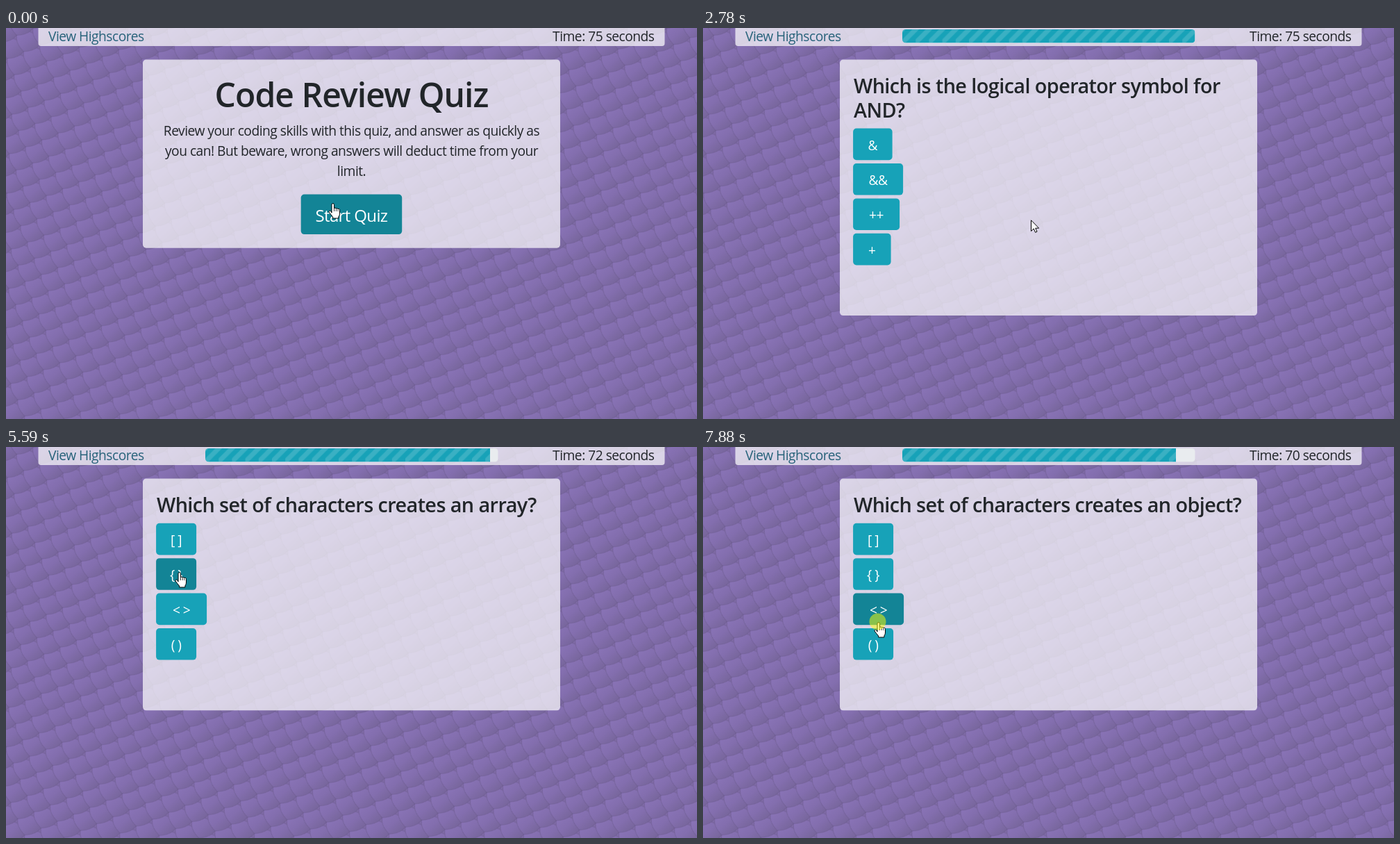
Write an HTML page that moves like this. It is 995x563 px and loops after 8000 ms.

```html
<!DOCTYPE html>
<html lang="en">
<head>
<meta charset="utf-8">
<title>Code Review Quiz</title>
<style>
html, body { margin: 0; width: 100%; height: 100%; overflow: hidden; background: #806ca8; }
svg { display: block; width: 995px; height: 563px; }
text { font-family: "Open Sans", "Noto Sans", sans-serif; font-size: 19.2px; letter-spacing: -.026em; fill: #212529; white-space: pre; }
.link { fill: #27627a; }
.h1 { font-size: 48px; font-weight: 600; letter-spacing: -.02em; }
.h4 { font-size: 28.8px; font-weight: 600; letter-spacing: -.02em; }
.big { font-size: 24px; }
.mid { text-anchor: middle; }
.end { text-anchor: end; }
.btn { fill: #fff; }
.note { font-style: italic; font-weight: 300; fill: #6c757d; }
.panel { fill: #fff; fill-opacity: .7; }
</style>
</head>
<body>
<svg viewBox="0 0 995 563">
  <defs>
    <linearGradient id="shade" x1="0" y1=".2" x2="1" y2=".6">
      <stop offset="0" stop-color="#8a74b8"/>
      <stop offset=".5" stop-color="#836eae"/>
      <stop offset="1" stop-color="#76659a"/>
    </linearGradient>
    <path id="scale" d="M-18-8V2C-17 13-8 18 0 22C8 18 17 13 18 2V-8Z" fill="url(#shade)" stroke="#6d5c90" stroke-width=".8"/>
    <pattern id="scales" width="36" height="36" patternUnits="userSpaceOnUse" patternTransform="rotate(22)"></pattern>
    <pattern id="stripes" width="19.2" height="19.2" patternUnits="userSpaceOnUse" x="287" y="2">
      <path d="M0 0H4.8L19.2 14.4V19.2H14.4L0 4.8ZM9.6 0H19.2V9.6Z" fill="none"/>
      <path d="M0 0H4.8L0 4.8ZM14.4 0H19.2V4.8L4.8 19.2H0V14.4Z" fill="#fff" fill-opacity=".15"/>
    </pattern>
    <clipPath id="track"><rect x="287" y="2" width="421.5" height="19.2" rx="4.5"/></clipPath>
    <g id="hand"><path d="M5 14V2.4a1.75 1.75 0 0 1 3.5 0V7.8a1.5 1.5 0 0 1 2.8.5 1.5 1.5 0 0 1 2.7.7 1.4 1.4 0 0 1 2.5 1.2V15q0 3-1.6 4.8V22H6.6V20Q4 17 1 12.9a1.5 1.5 0 0 1 2.3-1.6Z" fill="#fff" stroke="#000" stroke-linejoin="round"/><path d="M8.5 8V12M11.3 8.6V12M14 9.4V12" stroke="#000" stroke-width=".8"/></g>
    <path id="arrow" d="M.5 .8V16.5L4.2 13 6.6 18.3 9 17.2 6.7 12.2H11.6Z" fill="#fff" stroke="#000"/>
    <path id="beam" d="M0 .5H3L4 1.5 5 .5H8M4 1.5V14.5M0 15.5H3L4 14.5 5 15.5H8" fill="none" stroke="#111" stroke-width="1.2"/>
  </defs>
  <rect width="995" height="563" fill="url(#scales)"/>
  <path class="panel" d="M46.5 0H948.5V22Q948.5 26 944.5 26H50.5Q46.5 26 46.5 22Z"/>
  <text class="link" x="61" y="19">View Highscores</text>
  <g id="view"></g>
</svg>
<script>
const LOOP = 8000, BASE = "#17a2b8", HOVER = "#138496", ACTIVE = "#117a8b";
const $ = id => document.getElementById(id);

let tiles = "";
for (let row = 3; row >= -2; row--)
  for (let col = -1; col <= 2; col++)
    tiles += `<use href="#scale" x="${col * 36 + (row & 1) * 18}" y="${row * 18}"/>`;
$("scales").innerHTML = tiles;

const brackets = [["[ ]", 58], ["{ }", 58], ["< >", 73], ["( )", 58]];
const logical = "Which is the logical operator symbol for";
const pages = {
  and: { head: [logical, "AND?"], picks: [["&", 56.5], ["&&", 72], ["++", 67], ["+", 54.5]] },
  array: { head: ["Which set of characters creates an array?"], picks: brackets },
  or: { head: [logical, "OR?"], picks: [["\\\\", 55.5], ["||", 51], ["//", 56.5], ["++", 67]] },
  object: { head: ["Which set of characters creates an object?"], picks: brackets }
};

// Each step holds only what changes from the one before.
const steps = [
  { at: 0, page: "start", time: 75, bar: 708.5, hot: -1, note: 0, click: 0, cur: ["hand", 464, 252] },
  { at: 250, cur: ["hand", 464, 260] },
  { at: 500, cur: ["hand", 467, 276] },
  { at: 2530, click: 1 },
  { at: 2780, page: "and", click: 0, cur: ["arrow", 472, 276] },
  { at: 3310, cur: ["arrow", 465, 272] },
  { at: 3560, cur: ["arrow", 393, 243] },
  { at: 3810, time: 74, bar: 705, cur: ["hand", 269, 220] },
  { at: 4060, page: "array", bar: 703, note: 1, cur: ["hand", 254, 230] },
  { at: 4310, hot: 2, cur: ["hand", 242, 238] },
  { at: 4560, time: 73 },
  { at: 4840, bar: 698 },
  { at: 5090, bar: 697, note: 0 },
  { at: 5340, hot: 1, cur: ["hand", 243, 182] },
  { at: 5590, time: 72, cur: ["hand", 243, 180] },
  { at: 5840, page: "or", bar: 693, hot: -1, note: 1, cur: ["beam", 240.5, 115] },
  { at: 6090, bar: 691, hot: 1, cur: ["hand", 244, 218] },
  { at: 6340, cur: ["hand", 246, 219] },
  { at: 6590, time: 71 },
  { at: 6840, bar: 688, note: 0, click: 1 },
  { at: 7110, page: "object", bar: 686, hot: 2, note: 1, click: 0, cur: ["hand", 246, 247] },
  { at: 7360, cur: ["hand", 246, 252] },
  { at: 7610, time: 70 },
  { at: 7880, bar: 681, note: 0, click: 1 }
];
steps.forEach((s, i) => { steps[i] = { ...steps[i - 1], ...s }; });

const safe = s => s.replace(/&/g, "&amp;").replace(/</g, "&lt;");
const text = (cls, x, y, s) => `<text class="${cls}" x="${x}" y="${y}">${safe(s)}</text>`;
const box = (x, y, w, h, fill) => `<rect x="${x}" y="${y}" width="${w}" height="${h}" rx="4.8" fill="${fill}"/>`;
const panel = bottom => `<rect class="panel" x="197" y="45.5" width="601" height="${bottom - 45.5}" rx="4.8"/>`;

function startPage() {
  return panel(316.7) + text("h1 mid", 497.5, 114, "Code Review Quiz") +
    ["Review your coding skills with this quiz, and answer as quickly as",
     "you can! But beware, wrong answers will deduct time from your",
     "limit."].map((s, i) => text("mid", 497.5, 155 + i * 29, s)).join("") +
    box(424.7, 239.5, 145.5, 57.6, HOVER) + text("btn big mid", 497.5, 278.5, "Start Quiz");
}

function quizPage(s) {
  const { head, picks } = pages[s.page];
  const shift = (head.length - 1) * 34.8;
  let out = panel(379.3 + shift);
  out += `<g clip-path="url(#track)"><rect x="287" y="2" width="422" height="20" fill="#e9ecef"/>`;
  for (const fill of [BASE, "url(#stripes)"])
    out += `<rect x="287" y="2" width="${s.bar - 287}" height="20" fill="${fill}"/>`;
  out += "</g>";
  head.forEach((line, i) => out += text("h4", 217, 94 + i * 34.8, line));
  picks.forEach(([label, w], i) => {
    const y = 109.8 + shift + i * 50.4, hot = i === s.hot;
    if (hot && s.click && s.page === "or")
      out += `<rect x="214.2" y="${y - 1.9}" width="${w + 3.8}" height="49.4" rx="6.7" fill="none" stroke="#3ab0c3" stroke-opacity=".5" stroke-width="3.8"/>`;
    out += box(216.1, y, w, 45.6, !hot ? BASE : s.click && s.page === "or" ? ACTIVE : HOVER);
    out += text("btn mid", 216.1 + w / 2, y + 31, label);
  });
  if (s.note) out += text("note", 217, 334 + shift, "Correct!");
  return out;
}

function draw(s) {
  const [kind, x, y] = s.cur;
  $("view").innerHTML =
    text("end", 933.5, 19, `Time: ${s.time} seconds`) +
    (s.page === "start" ? startPage() : quizPage(s)) +
    `<use href="#${kind}" x="${x}" y="${y}"/>` +
    (s.click ? `<circle cx="${x + 5.5}" cy="${y - .5}" r="12" fill="#ff0" fill-opacity=".5"/>` : "");
}

let shown, begin = performance.now();
function tick() {
  const t = Math.max(0, performance.now() - begin) % LOOP;
  const now = steps.findLast(s => s.at <= t);
  if (now !== shown) draw(shown = now);
  requestAnimationFrame(tick);
}
tick();
</script>
</body>
</html>
```
